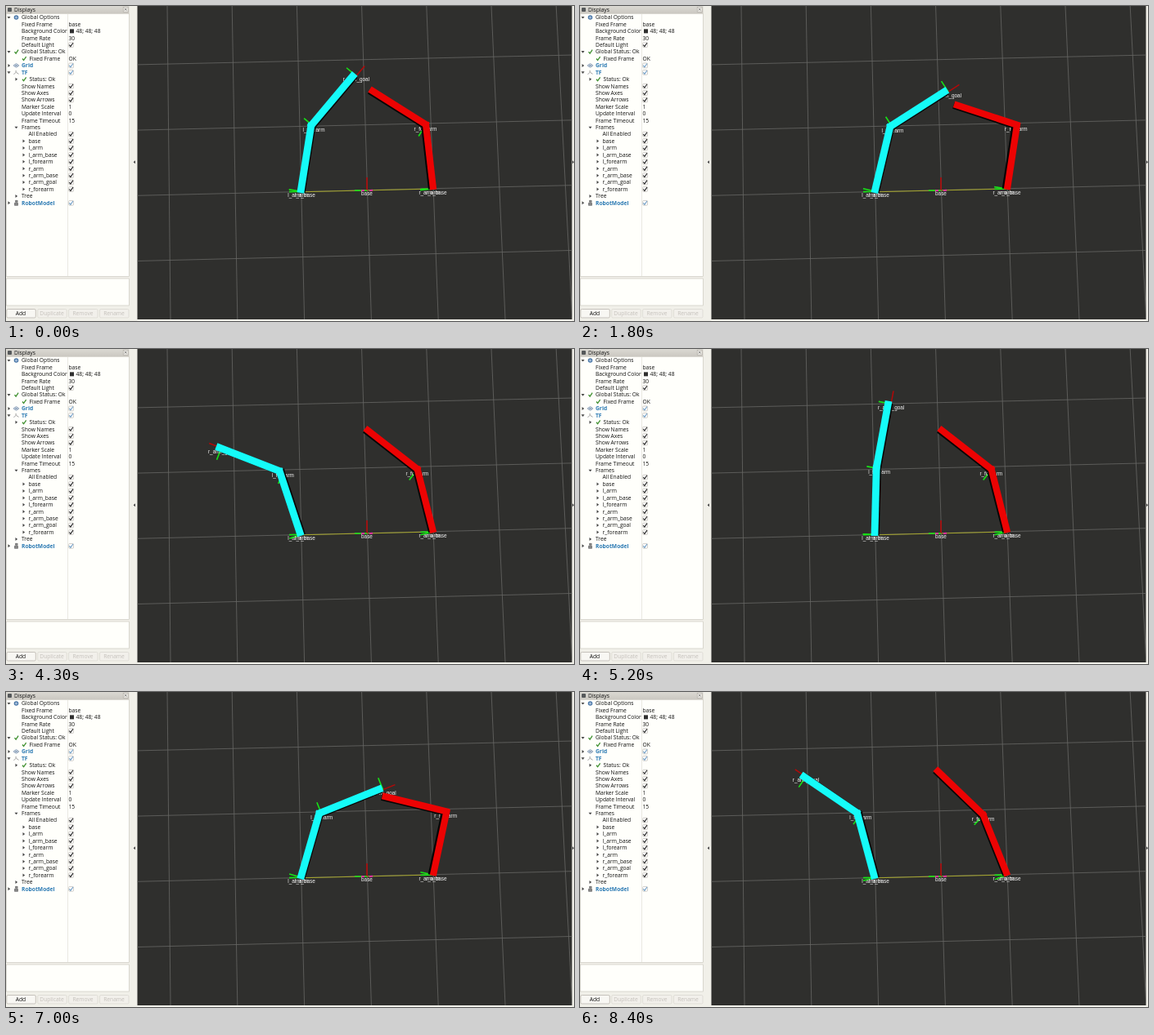
These frames come from a looping animation (694x386 px, 8.5 s). An HTML page:

```html
<!DOCTYPE html>
<html lang="en">
<head>
<meta charset="utf-8">
<title>Two arms</title>
<style>
  html, body { margin: 0; width: 100%; height: 100%; overflow: hidden; background: #f1f0e9; }
  svg { display: block; }
  .ui { font: 500 6.7px "Open Sans", "Noto Sans", sans-serif; fill: #111; }
  .bold { font-weight: 700; fill: #2b7ab3; }
  .off { fill: #c4c0bb; }
  .tag { font: 6.4px "Liberation Sans", Arial, sans-serif; fill: #f4f4f4; text-anchor: middle; }
  .mid { text-anchor: middle; }
</style>
</head>
<body>
<svg id="stage" width="694" height="386" viewBox="0 0 694 386">
  <defs>
    <linearGradient id="bar" x2="0" y2="1"><stop stop-color="#dbd9d3"/><stop offset="1" stop-color="#cbc8c1"/></linearGradient>
    <clipPath id="view"><rect x="160.5" width="531" height="384"/></clipPath>
  </defs>
  <g id="panel"></g>
  <g id="scene" clip-path="url(#view)"></g>
</svg>
<script>
const LOOP = 8500, STEP = 100;
const panel = document.getElementById('panel');
const scene = document.getElementById('scene');

function add(parent, tag, attrs, text) {
  const el = document.createElementNS('http://www.w3.org/2000/svg', tag);
  for (const key in attrs) el.setAttribute(key, attrs[key]);
  if (text) el.textContent = text;
  return parent.appendChild(el);
}
const rect = (x, y, width, height, fill, extra) => add(panel, 'rect', { x, y, width, height, fill, ...extra });
const path = (d, stroke, width, fill = 'none') => add(panel, 'path', { d, stroke, 'stroke-width': width, fill });
const label = (x, y, text, cls = '') => add(panel, 'text', { x, y, class: 'ui ' + cls }, text);

// ---- Displays panel ----
function arrow(x, y, open) {
  path(open ? `M${x - 2} ${y - 1}h4l-2 2.6z` : `M${x - 1} ${y - 2}v4l2.6 -2z`, 'none', 0, '#444');
}
function tick(x, y, color, width) {
  path(`M${x - 2} ${y}l1.6 2l3 -4.4`, color, width);
}
function checkbox(y, color) {
  rect(76.7, y - 2.9, 5.8, 5.8, '#fff', { stroke: '#b5b1aa', 'stroke-width': .6, rx: 1 });
  tick(79.3, y, color, 1.1);
}
function icon(kind, x, y) {
  if (kind === 'ok') tick(x, y, '#3d8f2d', 1.3);
  if (kind === 'gear') add(panel, 'circle', { cx: x, cy: y, r: 2.2, fill: '#9fb9d6', stroke: '#4b78a8', 'stroke-width': 1.2 });
  if (kind === 'grid') path(`M${x - 3.5} ${y}l3.5 -2.4l3.5 2.4l-3.5 2.4zM${x - 1.7} ${y - 1.2}l3.4 2.4M${x + 1.7} ${y - 1.2}l-3.4 2.4`, '#7088a5', .7, '#dbe4ee');
  if (kind === 'axes') path(`M${x - 3} ${y + 2.5}l2.6 -2.6v-2.4M${x} ${y}l3 2`, '#888', .8);
  if (kind === 'robot') path(`M${x - 2} ${y + 3}v-3h4v3zM${x - 1} ${y - 1}v-2h2.6v2z`, '#666', .7, '#888');
}

const PAPER = '#fffffb';
rect(0, 0, 694, 386, '#f1f0e9');
rect(0, 0, 150.5, 9, 'url(#bar)');
rect(2, 2, 5, 5, '#55585a', { rx: 1 });
label(10, 6.9, 'Displays');
rect(143.2, 1.2, 6, 6, '#eceae5', { stroke: '#aaa59d', 'stroke-width': .6 });
path('M144.8 2.8l2.8 2.8m0 -2.8l-2.8 2.8', '#666', .7);
rect(.3, 9.3, 150, 322, PAPER, { stroke: '#c5c1ba', 'stroke-width': .6 });
rect(.3, 334, 150, 33, PAPER, { stroke: '#c5c1ba', 'stroke-width': .6 });
path('M75.5 10v321', '#e4e2dc', .8);

const CHECK = true;
// indent, text, value, expander (1 open, 0 closed), icon
const rows = [
  [0, 'Global Options', '', 1, 'gear'],
  [1, 'Fixed Frame', 'base'], [1, 'Background Color', '48; 48; 48'],
  [1, 'Frame Rate', '30'], [1, 'Default Light', CHECK],
  [0, 'Global Status: Ok', '', 1, 'ok'], [1, 'Fixed Frame', 'OK', , 'ok'],
  [0, 'Grid', CHECK, 0, 'grid'], [0, 'TF', CHECK, 1, 'axes'],
  [1, 'Status: Ok', '', 0, 'ok'], [1, 'Show Names', CHECK],
  [1, 'Show Axes', CHECK], [1, 'Show Arrows', CHECK],
  [1, 'Marker Scale', '1'], [1, 'Update Interval', '0'], [1, 'Frame Timeout', '15'],
  [1, 'Frames', '', 1], [2, 'All Enabled', CHECK],
  ...['base', 'l_arm', 'l_arm_base', 'l_forearm', 'r_arm', 'r_arm_base', 'r_arm_goal', 'r_forearm'].map(n => [2, n, CHECK, 0]),
  [1, 'Tree', '', 0], [0, 'RobotModel', CHECK, 0, 'robot']
];
rows.forEach(([depth, text, value, expander, mark], i) => {
  const y = 14 + 8.42 * i;
  const display = depth === 0 && value === CHECK;
  if (expander !== undefined) arrow(3.5 + 9 * depth, y, expander);
  if (mark) icon(mark, 12.5 + 9.5 * depth, y);
  const x = (depth === 2 ? 27.5 : 19) + (depth && mark ? 9.5 : 0);
  label(x, y + 2.3, text, display ? 'bold' : '');
  if (value === CHECK) checkbox(y, display ? '#6d9cc4' : '#222');
  else if (value) {
    const swatch = text === 'Background Color';
    if (swatch) rect(78, y - 2.5, 5, 5, '#303030');
    label(swatch ? 85.5 : 76.5, y + 2.3, value);
  }
});

['Add', 'Duplicate', 'Remove', 'Rename'].forEach((text, i) => {
  rect(.8 + 37.9 * i, 371.5, 35.5, 10.5, i ? '#f2f0eb' : '#f8f7f3', { stroke: i ? '#d9d6cf' : '#b3aea6', 'stroke-width': .7, rx: 1.5 });
  label(18 + 38 * i, 379, text, i ? 'off mid' : 'mid');
});
path('M158 189.3v4l-2.4 -2z', 'none', 0, '#444');
path('M692 189.3v4l2 -2z', 'none', 0, '#444');

// ---- 3D view ----
const line = (stroke, width) => add(scene, 'line', { stroke, 'stroke-width': width });
function place(el, [x1, y1], [x2, y2]) {
  el.setAttribute('x1', x1); el.setAttribute('y1', y1);
  el.setAttribute('x2', x2); el.setAttribute('y2', y2);
}
const polar = ([x, y], angle, length) => {
  const a = angle * Math.PI / 180;
  return [x + length * Math.sin(a), y - length * Math.cos(a)];
};
const shrink = (cx, cy, k) => ([x, y]) => [cx + (x - cx) * k, cy + (y - cy) * k];
// Frames and the undersides of the links lie below the link tops.
const ground = shrink(490, 190, .973);
const underside = shrink(427, 190, .978);

add(scene, 'rect', { x: 160, y: 0, width: 532, height: 384, fill: '#2f2f2d' });
for (let i = 0; i < 7; i++) place(line('#686865', .8), [197 + 79.2 * i, 0], [201 + 81.8 * i, 384]);
for (let i = 0; i < 4; i++) place(line('#686865', .8), [160, 71.9 + 80.2 * i], [694, 60 + 79.8 * i]);

const GREEN = '#16e416', RED = '#b40808', PINK = '#e0319f';
const center = [441, 226];
place(line('#a5a52c', 1), [361, 227.8], [521, 224]);
place(line(RED, 1.6), center, [441, 210]);
place(line(GREEN, 1.6), center, [426, 226]);
place(line(PINK, 2), [434, 226.2], [438, 226.1]);
place(line(PINK, 2), [444, 225.9], [448, 225.8]);

function tag(text, at) {
  const el = add(scene, 'text', { class: 'tag' }, text);
  const move = ([x, y]) => { el.setAttribute('x', x); el.setAttribute('y', y + 6.5); };
  if (at) move(at);
  return move;
}

function frame(text, withX) {
  const xAxis = withX && line(RED, 1.5), yAxis = line(GREEN, 1.6), moveTag = tag(text);
  return (at, angle) => {
    if (xAxis) place(xAxis, at, polar(at, angle, 16));
    place(yAxis, at, polar(at, angle - 90, 15.5));
    moveTag(at);
  };
}

function makeArm(side, base, root, color, width, lengths, hasGoal) {
  place(line(GREEN, 1.6), root, polar(root, -91.4, 15));
  tag(side + '_arm_base', root);
  const shoulder = frame(side + '_arm');
  const forearm = frame(side + '_forearm');
  const goal = hasGoal && frame('r_arm_goal', true);
  const shades = [line('#050505', width), line('#050505', width)];
  const tops = [line(color, width), line(color, width)];
  return (upper, lower) => {
    const elbow = polar(base, upper, lengths[0]);
    const tip = polar(elbow, lower, lengths[1]);
    const links = [
      [polar(base, upper, -1), polar(elbow, upper, 3)],
      [polar(elbow, lower, -3), tip]
    ];
    links.forEach((ends, i) => {
      place(tops[i], ...ends);
      place(shades[i], ...ends.map(underside));
    });
    shoulder(root, upper);
    forearm(ground(elbow), lower);
    if (goal) goal(ground(tip), lower);
  };
}
tag('base', [441, 225.5]);
const leftArm = makeArm('l', [360, 228], [361, 227.3], '#15fbf8', 8.8, [82.6, 83], true);
const rightArm = makeArm('r', [522, 224], [521.5, 224], '#ec0303', 8.2, [79.3, 81], false);

// ---- motion ----
function interpolate(points, x) {
  let i = 1;
  while (i < points.length - 1 && x > points[i][0]) i++;
  const a = points[i - 1], b = points[i];
  const k = (x - a[0]) / (b[0] - a[0]);
  return a.slice(1).map((v, j) => v + (b[j + 1] - v) * k);
}
// Forearm heading of the left arm, swinging back and forth at steady speed.
const swing = [[0, 41.4], [1000, 124], [1800, 58.7], [3200, -67.3], [3750, -117], [4300, -67.3],
  [6100, 90.7], [6430, 120], [7000, 69.5], [8400, -54.3]];
// Left heading the right arm is solved for: it trails a little and holds while out of reach.
const followed = [[0, 55], [250, 55], [1080, 124], [1800, 70], [2000, 52], [5716, 52],
  [6100, 86], [6490, 120], [7000, 75], [7300, 49], [8500, 49]];
// Right arm headings that reach the left tip.
const reach = [[49, -21.8, -46], [55, -6.5, -57.8], [70, 8.7, -71.8], [86, 19.1, -86.3],
  [100, 20.5, -102], [124, 6, -133]];
const TILT = 1.4;

function draw(t) {
  const [heading] = interpolate(swing, t);
  leftArm(heading / 4 - TILT, heading - TILT);
  rightArm(...interpolate(reach, interpolate(followed, t)[0]));
}

const start = performance.now();
function tickFrame() {
  const t = (performance.now() - start) % LOOP;
  draw(Math.floor(t / STEP) * STEP);
  requestAnimationFrame(tickFrame);
}
tickFrame();
</script>
</body>
</html>
```
